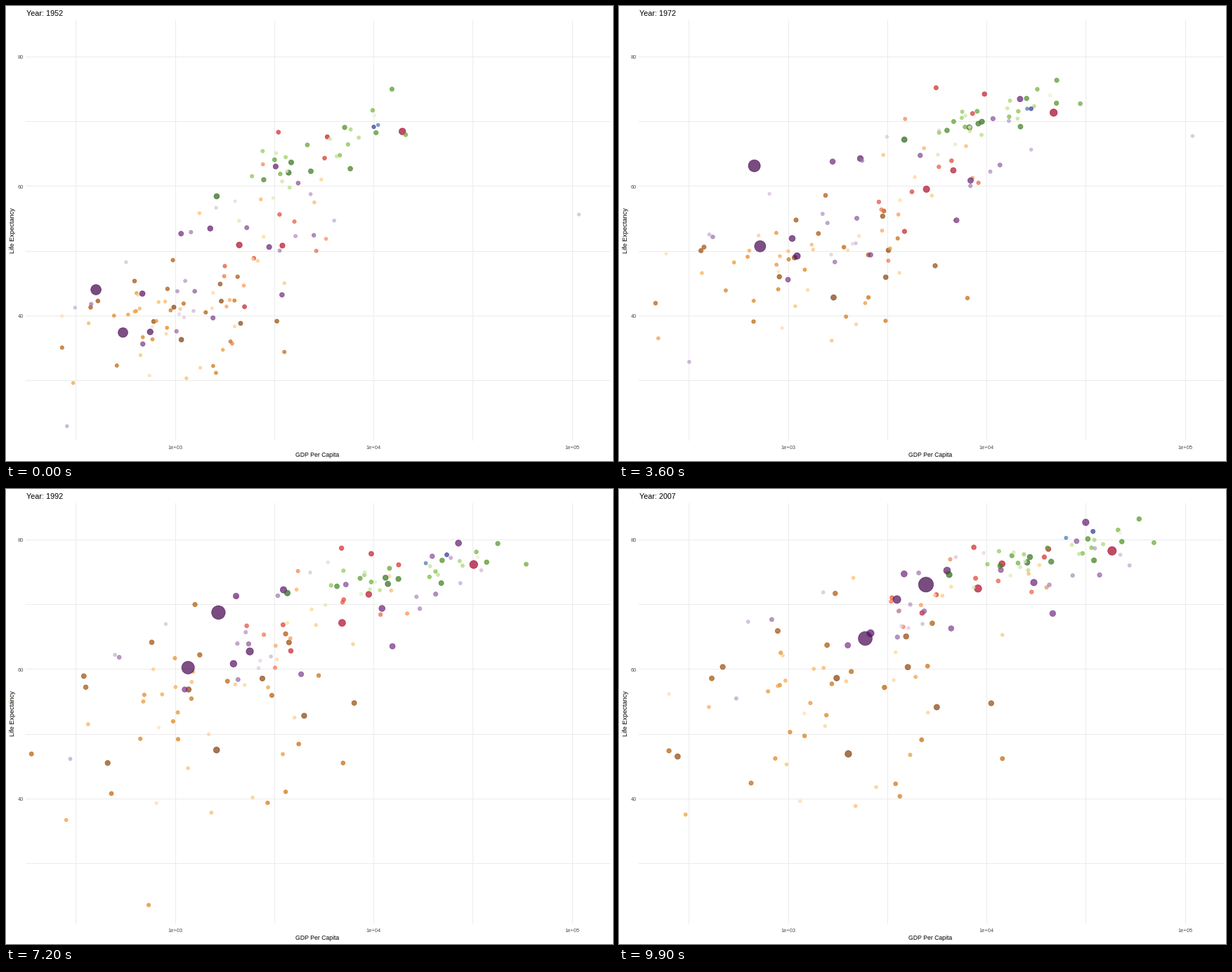
Write a matplotlib script that moves like this. It is 864 px wide and 648 px high and loops after 10 s.

```python
import numpy as np
import matplotlib.pyplot as plt
from matplotlib.animation import FuncAnimation
from matplotlib.colors import LinearSegmentedColormap

W, H, DPI = 864, 648, 72
FRAMES, INTERVAL = 100, 100
FIRST, LAST = 1952, 2007
LEFT, RIGHT, TOP, BOTTOM = 28, 859, 20, 618

YEARS = np.linspace(FIRST, LAST, FRAMES)
SURVEYS = np.arange(FIRST, LAST + 1, 5)   # dots move straight between surveys
TREND_YEARS = (1952, 1977, 1992, 2007)
rng = np.random.default_rng(12)

# The crowd of a continent is a cloud whose centre and spread follow a trend.
# Leaders are the few dots that stand apart: population, {year: (income, life)}.
CONTINENTS = [
    dict(shades=["#7F3B08", "#B35806", "#E08214", "#FDB863", "#FEE0B6"],
         count=49, top_pop=80, decay=.095, growth=3.8, link=.35, wander=.05,
         income=(980, 1400, 1400, 1740), income_sd=(.28, .37, .39, .42),
         life=(39.2, 49.6, 53.6, 54.8), life_sd=(5, 6, 8.5, 9),
         leaders=[
             (135, {1952: (1077, 36.3), 1972: (1698, 42.8), 1992: (1620, 47.5),
                    2007: (2014, 46.9)}),
             (65, {1952: (781, 39.1), 1972: (905, 46), 1992: (458, 45.5),
                   2002: (241, 45), 2007: (278, 46.5)}),
             (8.9, {1952: (493, 40), 1987: (848, 44), 1992: (737, 23.6),
                    1997: (590, 36.1), 2007: (863, 46.2)}),
         ]),
    dict(shades=["#A50026", "#D73027", "#F46D43", "#FDAE61", "#FEE090"],
         count=22, top_pop=44, decay=.16, growth=2.2, link=.55, wander=.03,
         income=(3000, 5400, 5400, 7400), income_sd=(.19, .17, .24, .29),
         life=(53, 64.5, 69.5, 73), life_sd=(8.5, 6.5, 4.8, 3.2),
         leaders=[
             (301, {1952: (13990, 68.4), 1972: (21806, 71.3), 1992: (32004, 76.1),
                    2007: (42952, 78.2)}),
             (190, {1952: (2109, 50.9), 1972: (4986, 59.5), 1992: (6950, 67.1),
                    2007: (9066, 72.4)}),
             (109, {1952: (3478, 50.8), 1972: (6809, 62.4), 1992: (9472, 71.5),
                    2007: (11978, 76.2)}),
         ]),
    dict(shades=["#40004B", "#762A83", "#9970AB", "#C2A5CF", "#E7D4E8"],
         count=27, top_pop=150, decay=.19, growth=2.6, link=.7, wander=.04,
         income=(1500, 3300, 4000, 6300), income_sd=(.36, .5, .53, .53),
         life=(47, 60, 66.5, 71), life_sd=(8.5, 8.5, 7, 5.5),
         leaders=[
             (1319, {1952: (400, 44), 1962: (488, 44.5), 1967: (613, 58.4),
                     1972: (677, 63.1), 1982: (962, 65.5), 1992: (1656, 68.7),
                     2002: (3119, 72), 2007: (4959, 73)}),
             (1110, {1952: (547, 37.4), 1972: (724, 50.7), 1982: (856, 56.6),
                     1992: (1164, 60.2), 2002: (1747, 62.9), 2007: (2452, 64.7)}),
             (224, {1952: (750, 37.5), 1972: (1111, 49.2), 1992: (2383, 62.7),
                    2007: (3541, 70.7)}),
             (169, {1952: (685, 43.4), 1972: (1050, 51.9), 1992: (1972, 60.8),
                    2007: (2606, 65.5)}),
             (127, {1952: (3217, 63), 1972: (14779, 73.4), 1992: (26825, 79.4),
                    2007: (31656, 82.6)}),
             (2.5, {1952: (108382, 55.6), 1967: (80895, 64.6), 1972: (109348, 67.7),
                    1982: (31354, 71.3), 1992: (34933, 75.2), 2007: (47307, 77.6)}),
         ]),
    dict(shades=["#276419", "#4D9221", "#7FBC41", "#B8E186", "#E6F5D0"],
         count=30, top_pop=82, decay=.14, growth=1.35, link=.85, wander=.02,
         income=(4900, 13000, 14500, 21500), income_sd=(.24, .2, .29, .26),
         life=(64.5, 72, 74.5, 77.7), life_sd=(5, 2.4, 2.4, 2.6),
         leaders=[]),
    dict(shades=["#313695", "#4575B4"], count=0, growth=2.3,
         leaders=[
             (20.4, {1952: (10040, 69.1), 1972: (16789, 71.9), 1992: (23425, 77.6),
                     2007: (34435, 81.2)}),
             (4.1, {1952: (10557, 69.4), 1972: (16046, 71.9), 1992: (18363, 76.3),
                    2007: (25185, 80.2)}),
         ]),
]


def to_x(income):
    return 240.5 + 282.5 * (np.log10(income) - 3)


def to_y(life):
    return 71.5 + 9.2375 * (80 - life)


def radius(pop):
    return 2 + 8.6 * np.sqrt(pop / 1319)


def path(years, income, life):
    """Pixel position in every frame, straight between the given years."""
    return np.column_stack([np.interp(YEARS, years, to_x(np.asarray(income))),
                            np.interp(YEARS, years, to_y(np.asarray(life)))])


def scores(n):
    z = rng.normal(size=n)
    return np.clip((z - z.mean()) / z.std(), -2, 2)[:, None]


def drift(n, step):
    """Random walks that start and end at zero."""
    walk = np.cumsum(rng.normal(0, step, (n, len(SURVEYS))), axis=1)
    walk -= walk[:, :1]
    return walk - walk[:, -1:] * np.linspace(0, 1, len(SURVEYS))


def crowd(c):
    """Population and path of each dot in a continent's cloud."""
    n = c["count"]
    mid, mid_sd, age, age_sd = (
        np.interp(SURVEYS, TREND_YEARS, v)
        for v in (np.log10(c["income"]), c["income_sd"], c["life"], c["life_sd"]))
    wealth, luck = scores(n), scores(n)
    health = c["link"] * wealth + np.sqrt(1 - c["link"] ** 2) * luck
    income = 10 ** (mid + mid_sd * wealth + drift(n, c["wander"]))
    life = age + age_sd * health + drift(n, 8 * c["wander"])
    pops = c["top_pop"] * np.exp(-c["decay"] * np.arange(n))
    return [(p, path(SURVEYS, g, l)) for p, g, l in zip(pops, income, life)]


def leader(pop, points):
    income, life = zip(*points.values())
    return pop, path(list(points), income, life)


paths, sizes, colors = [], [], []
for c in CONTINENTS:
    dots = [leader(*d) for d in c["leaders"]]
    if c["count"]:
        dots += crowd(c)
    dots.sort(key=lambda d: -d[0])
    cmap = LinearSegmentedColormap.from_list("shades", c["shades"])
    for rank, (pop, xy) in enumerate(dots):
        r = np.interp(YEARS, (FIRST, LAST), (radius(pop / c["growth"]), radius(pop)))
        paths.append(xy)
        sizes.append((2 * r) ** 2)
        colors.append(cmap(rank / (len(dots) - 1))[:3])
paths, sizes, colors = np.array(paths), np.array(sizes), np.array(colors)


def with_alpha(alpha):
    return np.column_stack([colors, np.full(len(colors), alpha)])


plt.rcParams["font.family"] = "Liberation Sans"
fig = plt.figure(figsize=(W / DPI, H / DPI), dpi=DPI, facecolor="white")
ax = fig.add_axes((0, 0, 1, 1))
ax.set(xlim=(0, W), ylim=(H, 0))
ax.axis("off")

grid = dict(color="#EBEBEB", lw=1, zorder=0)
tick = dict(size=7.5, color="#4D4D4D")
for half in range(5, 11):
    x = to_x(10 ** (half / 2))
    ax.plot([x, x], [TOP, BOTTOM], **grid)
    if half % 2 == 0:
        ax.text(x, 630.7, f"1e+{half // 2:02d}", ha="center", **tick)
for life in range(30, 81, 10):
    y = to_y(life)
    ax.plot([LEFT, RIGHT], [y, y], **grid)
    if life >= 40 and life % 20 == 0:
        ax.text(25, y + 3.3, str(life), ha="right", **tick)

ax.text(443.5, 641.8, "GDP Per Capita", size=8.6, ha="center")
ax.text(10, 319.5, "Life Expectancy", size=9.1, rotation=90, ha="center", va="center")
title = ax.text(29, 14.3, "", size=10.8)

marks = ax.scatter(*paths[:, 0].T, s=sizes[:, 0], linewidths=.9, zorder=2,
                   facecolors=with_alpha(.7), edgecolors=with_alpha(.6))


def update(i):
    marks.set_offsets(paths[:, i])
    marks.set_sizes(sizes[:, i])
    title.set_text(f"Year: {round(YEARS[i])}")
    return marks, title


anim = FuncAnimation(fig, update, frames=FRAMES, interval=INTERVAL,
                     repeat=True, repeat_delay=0)
plt.show()
```
